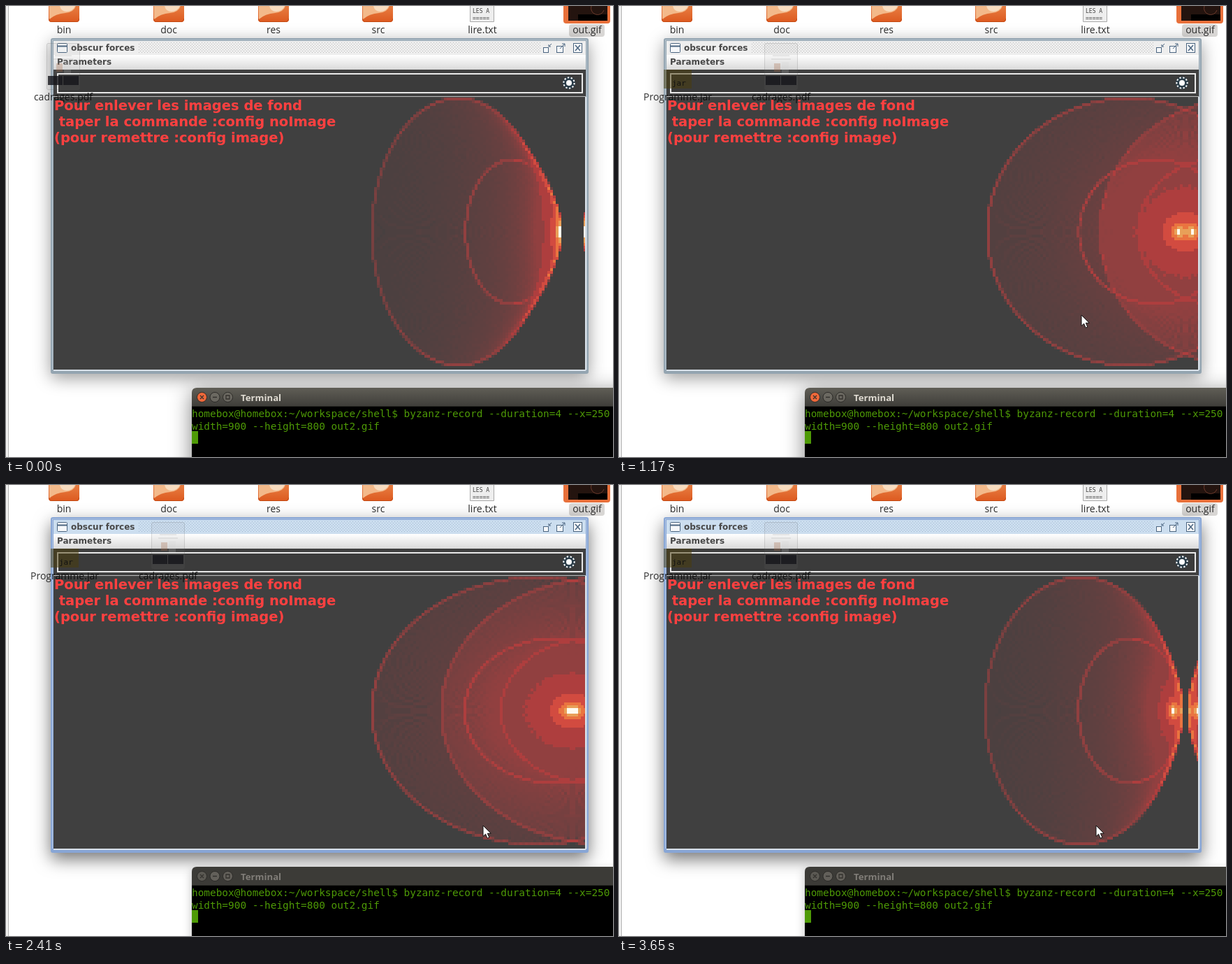
Animation, 869 px wide and 645 px high, one loop 3750 ms. Source, as an HTML page with a canvas:

```html
<!DOCTYPE html>
<html lang="fr">
<head>
<meta charset="utf-8">
<title>obscur forces</title>
<style>
html, body { margin: 0; width: 869px; height: 645px; overflow: hidden; background: #fff; }
#stage { position: relative; width: 869px; height: 645px; overflow: hidden; }
#stage > * { position: absolute; left: 0; top: 0; }
svg { display: block; }
text { white-space: pre; }
.label { font: 14px "Open Sans", "Noto Sans", sans-serif; text-anchor: middle; fill: #2c2c2c; }
.ui { font: bold 12px "DejaVu Sans", sans-serif; fill: #484848; }
.note { font: bold 19.5px "DejaVu Sans", sans-serif; fill: #ff4040; }
.mono { font: 14.42px "DejaVu Sans Mono", monospace; fill: #4e9a06; }
.tiny { font: 8px "DejaVu Sans Mono", monospace; fill: #444; }
.caption { font: bold 13.2px "Noto Sans", "Open Sans", sans-serif; fill: #dfdbd2; }
.frame { fill: #94a5b1; }
.bar { fill: #eee; }
.dot { fill: #bcbcbc; }
.shade { border-radius: 5px; }
#winShade { left: 64px; top: 46px; width: 770px; height: 480px; box-shadow: 0 6px 24px rgba(0,0,0,.4); }
#termShade { left: 266px; top: 546px; width: 640px; height: 200px; box-shadow: 0 6px 30px rgba(0,0,0,.5); }
.focus #winShade { box-shadow: 0 9px 24px rgba(0,0,0,.55); }
.focus #termShade { box-shadow: 0 5px 14px rgba(0,0,0,.25); }
.focus .frame { fill: #88a6d6; }
.focus .bar { fill: #ccdeef; }
.focus .dot { fill: #a3b9d2; }
.focus .caption { fill: #807d78; }
.focus .termBar { fill: #3c3b37; }
.focus .close { fill: #5b5953; }
.listed .before, .after { display: none; }
.listed .after { display: inline; }
#field { left: 523px; top: 130px; }
</style>
</head>
<body>
<div id="stage">
  <svg width="869" height="645">
    <defs>
      <linearGradient id="orange" x2="0" y2="1">
        <stop offset="0" stop-color="#e9854a"/><stop offset="1" stop-color="#dd5a20"/>
      </linearGradient>
      <g id="folder">
        <path d="M-22-5h44v24q0 4-4 4h-36q-4 0-4-4z" fill="url(#orange)"/>
        <path d="M-21 0h38q-3 9-15 10q-14 1-23 9z" fill="#f3b98a"/>
        <path d="M-6 0h22q-3 7-12 8q-8 0-10-8z" fill="#f8dcc0"/>
        <path d="M-21.500 18q0 4.500 4 4.500h35q4 0 4-4.500" fill="none" stroke="#c24a14"/>
      </g>
    </defs>
    <rect width="3" height="645" fill="#f1f1f1"/>
    <rect x="3" width="1" height="645" fill="#b2b2b2"/>
    <use href="#folder" x="83"/><use href="#folder" x="233"/>
    <use href="#folder" x="383"/><use href="#folder" x="532"/>
    <path d="M664.500 0v22.500h34V0" fill="#eee" stroke="#aaa"/>
    <text class="tiny" x="668" y="10">LES A</text>
    <text class="tiny" x="668" y="20">=====</text>
    <path d="M798 0h67v21q0 4-4 4h-59q-4 0-4-4z" fill="#e8703a"/>
    <path d="M805 0h56v21h-56z" fill="#24140f"/>
    <path d="M819 12h42v9h-42z" fill="#000"/>
    <path d="M838 0a9 9 0 0 0 18 6" fill="none" stroke="#6b3a2c"/>
    <rect x="806" y="26" width="51" height="18" rx="4" fill="#d9d7d5"/>
    <g class="label">
      <text x="83" y="39">bin</text><text x="233" y="39">doc</text><text x="383" y="39">res</text>
      <text x="533" y="39">src</text><text x="682" y="39">lire.txt</text><text x="832" y="39">out.gif</text>
    </g>
  </svg>

  <div id="winShade" class="shade"></div>
  <div id="termShade" class="shade"></div>

  <svg width="869" height="645">
    <defs>
      <pattern id="dots" width="4" height="4" patternUnits="userSpaceOnUse">
        <path class="dot" d="M0 0h1v1h-1zM2 2h1v1h-1z"/>
      </pattern>
      <linearGradient id="menu" x2="0" y2="1">
        <stop offset="0" stop-color="#fff"/><stop offset="1" stop-color="#dadada"/>
      </linearGradient>
      <linearGradient id="termTop" x2="0" y2="1">
        <stop offset="0" stop-color="#605e56"/><stop offset="1" stop-color="#3e3d39"/>
      </linearGradient>
      <g id="page">
        <rect x="-23.500" y="53.500" width="47" height="66" rx="2" fill="#888" fill-opacity=".07" stroke="#555" stroke-opacity=".2"/>
        <path d="M-12 71h24M-14 76h28" stroke="#777" stroke-opacity=".25"/>
        <rect x="-10" y="82" width="9" height="12" fill="#a66a4a" opacity=".3"/>
        <rect x="1" y="80" width="10" height="16" fill="#ccc" opacity=".18"/>
        <path d="M-22 100h21v13h-21zM0 100h22v13H0z" fill="#15151a" opacity=".8"/>
      </g>
    </defs>

    <rect class="frame" x="64" y="46" width="770" height="480" rx="3"/>
    <path d="M66.500 520V48.500h765V520" fill="none" stroke="#dce6ee" stroke-opacity=".5"/>
    <rect class="bar" x="68" y="50" width="762" height="20"/>
    <rect x="190" y="52" width="576" height="16" fill="url(#dots)"/>
    <rect x="68" y="70" width="762" height="21" fill="url(#menu)"/>
    <rect x="68" y="91" width="762" height="430" fill="#404040"/>
    <rect x="74" y="97" width="751" height="27" fill="#3b3b3b" stroke="#e8e8e8" stroke-width="2"/>
    <path d="M68 129.500h762" stroke="#bdbdbd"/>
    <path d="M68 521h762M830 130v391" fill="none" stroke="#d8e0e8" stroke-width="2"/>
    <g fill="#f6f8fa" stroke="#4b6580">
      <rect x="73.500" y="53.500" width="14" height="13" rx="1"/>
      <path d="M74 57.500h13" stroke-width="2"/>
      <rect x="769.500" y="59.500" width="7" height="7"/>
      <path d="M781 54l-4 4m0-3v3h3" fill="none"/>
      <rect x="788.500" y="57.500" width="9" height="9"/>
      <path d="M793 61l7-7m-4 0h4v4" fill="none"/>
      <rect x="812.500" y="53.500" width="12" height="13"/>
      <path d="M815 56l7 8m0-8l-7 8" fill="none" stroke-width="1.500"/>
    </g>
    <text class="ui" x="93" y="64">obscur forces</text>
    <text class="ui" x="73" y="84">Parameters</text>

    <g class="before">
      <use href="#page" x="82"/>
      <text class="label" x="82" y="135" opacity=".8" style="fill:#000">cadrages.pdf</text>
    </g>
    <g class="after">
      <path d="M64 91h40v27H64z" fill="#4a3c08" opacity=".5"/>
      <text class="tiny" x="76" y="114" style="font-size:11px;fill:#111">jar</text>
      <use href="#page" x="232"/>
      <g class="label" opacity=".8" style="fill:#000">
        <text x="84" y="135">Programme.jar</text><text x="232" y="135">cadrages.pdf</text>
      </g>
    </g>

    <g class="note">
      <text x="69" y="149">Pour enlever les images de fond</text>
      <text x="69" y="172"> taper la commande :config noImage</text>
      <text x="69" y="195">(pour remettre :config image)</text>
    </g>
    <circle cx="806" cy="110" r="9" fill="#2c3e4a"/>
    <circle cx="806" cy="110" r="4" fill="#fff"/>
    <circle id="spin" cx="806" cy="110" r="7.700" fill="none" stroke="#fff" stroke-width="2" stroke-dasharray="2.400 2.438"/>

    <path class="termBar" d="M266 573v-20q0-7 7-7h596v27z" fill="url(#termTop)"/>
    <path d="M266 572.500h603" stroke="#2a2925"/>
    <path d="M266 573h603v72H266z"/>
    <g stroke="#2b2a27" fill="#7d7a72">
      <circle class="close" cx="280.500" cy="559.500" r="7" fill="#f0693a"/>
      <circle cx="299" cy="559.500" r="7" fill-opacity=".6"/>
      <circle cx="317.500" cy="559.500" r="7" fill-opacity=".6"/>
    </g>
    <path d="M278 557l5 5m0-5l-5 5M296 559.500h6M315 557h5v5h-5z" fill="none" stroke="#33312d" stroke-width="1.300"/>
    <text class="caption" x="336" y="565">Terminal</text>
    <text class="mono" x="266" y="588">homebox@homebox:~/workspace/shell$ byzanz-record --duration=4 --x=250</text>
    <text class="mono" x="266" y="606">width=900 --height=800 out2.gif</text>
    <rect id="caret" x="266" y="608" width="9" height="18" fill="#4e9a06"/>
  </svg>

  <canvas id="field" width="306" height="390"></canvas>

  <svg width="869" height="645">
    <path id="mouse" d="M0 0v15.500l3.600-3.300 2.500 6 2.700-1.200-2.500-5.700h4.900z" fill="#fff" stroke="#111"/>
  </svg>
</div>
<script>
const LOOP = 3750, CELL = 4, COLS = 73, ROWS = 49;
const CX = 811 - 523, CY = 323 - 130, RADIUS = 191, INNER = 0.54;
const RINGS = 300, SPOKES = 300;
const $ = id => document.getElementById(id);
const stage = $("stage"), ctx = $("field").getContext("2d");
const grid = new Float32Array(COLS * ROWS);

// Redraw moments: first, last, count
const ticks = [0];
for (const [from, to, n] of [[50, 560, 11], [610, 1120, 10], [1170, 1690, 10], [1750, 2260, 10],
                             [2310, 2800, 9], [2850, 3340, 10], [3390, 3650, 6]]) {
  for (let i = 0; i < n; i++) {
    ticks.push(10 * Math.ceil((from + (to - from) * i / (n - 1)) / 10 - 1e-6));
  }
}

// Density to colour: smooth when thin, banded when dense
const stops = [[0, 64, 64, 64], [1.1, 90, 64, 64], [2.3, 111, 64, 64], [4.6, 145, 64, 64], [8, 174, 62, 62],
               [17, 210, 75, 64], [32, 234, 116, 64], [50, 232, 160, 88], [88, 255, 250, 238]];
function colour(v) {
  let i = 0;
  while (i < stops.length - 1 && v >= stops[i + 1][0]) i++;
  const a = stops[i], b = stops[i + 1];
  const f = i < 3 ? (v - a[0]) / (b[0] - a[0]) : 0;
  const mix = c => Math.round(a[c] + (f ? (b[c] - a[c]) * f : 0));
  return `rgb(${mix(1)},${mix(2)},${mix(3)})`;
}
const palette = Array.from({ length: 900 }, (_, i) => colour(i / 10));

// One ring of a cone seen from the side; both halves fold onto one grid
function addRing(s, lean, width, spokes, mass) {
  const mid = lean * (0.12 + 0.606 * s + 0.274 * s * s);
  for (let j = 0; j < spokes; j++) {
    const angle = Math.PI * (j + 0.5) / spokes;
    let col = Math.floor((mid + width * s * Math.cos(angle)) / CELL);
    if (col < 0) col = -1 - col;
    const row = Math.floor(RADIUS * s * Math.sin(angle) / CELL);
    if (col < COLS) grid[row * COLS + col] += mass / spokes;
  }
}

function drawField(t) {
  const d = Math.abs(t / 1000 - 1.94);
  const lean = 125 * d / (1 + 0.25 * d);
  const reach = 287 - 4 * Math.exp(-(((t - 1350) / 350) ** 2));
  const width = reach - lean;
  const gain = Math.min(1, width / 210);  // narrow views grow no denser
  grid.fill(0);
  for (let i = 0; i < RINGS; i++) addRing((i + 0.5) / RINGS, lean, width, SPOKES, gain * 1e4 / RINGS);
  addRing(1, lean, width, 1200, gain * 650);
  addRing(INNER, lean, width, 1200, gain * 500);

  ctx.clearRect(0, 0, 306, 390);
  for (let r = 0; r < ROWS; r++) {
    for (let c = 0; c < COLS; c++) {
      const v = grid[r * COLS + c];
      if (!v) continue;
      ctx.fillStyle = palette[Math.min(899, Math.floor(v * 10))];
      for (const y of [CY - CELL * (r + 1), CY + CELL * r]) {
        ctx.fillRect(CX - CELL * (c + 1), y, CELL, CELL);
        if (c < 5) ctx.fillRect(CX + CELL * c, y, CELL, CELL);
      }
    }
  }
}

function mousePath(t) {
  const ease = (from, to) => {
    const p = Math.min(1, Math.max(0, (t - from) / (to - from)));
    return p * p * (3 - 2 * p);
  };
  const rest = ease(1170, 1460), drop = ease(1690, 1980);
  return [662 - rest + 22 * drop, 442 - 2 * rest + 47 * drop];
}

function draw(t) {
  drawField(t);
  stage.classList.toggle("listed", t >= 860);
  stage.classList.toggle("focus", t >= 1300);
  $("caret").style.visibility = (t + 300) % 1200 < 600 ? "visible" : "hidden";
  $("spin").setAttribute("transform", `rotate(${t * 0.36} 806 110)`);
  const [x, y] = mousePath(t);
  $("mouse").setAttribute("transform", `translate(${x} ${y})`);
  $("mouse").style.visibility = t >= 1170 ? "visible" : "hidden";
}

const start = performance.now();
let last = -1;
function loop() {
  const t = Math.max(0, performance.now() - start) % LOOP;
  let i = ticks.length - 1;
  while (ticks[i] > t) i--;
  if (i !== last) draw(ticks[last = i]);
  requestAnimationFrame(loop);
}
loop();
</script>
</body>
</html>
```
